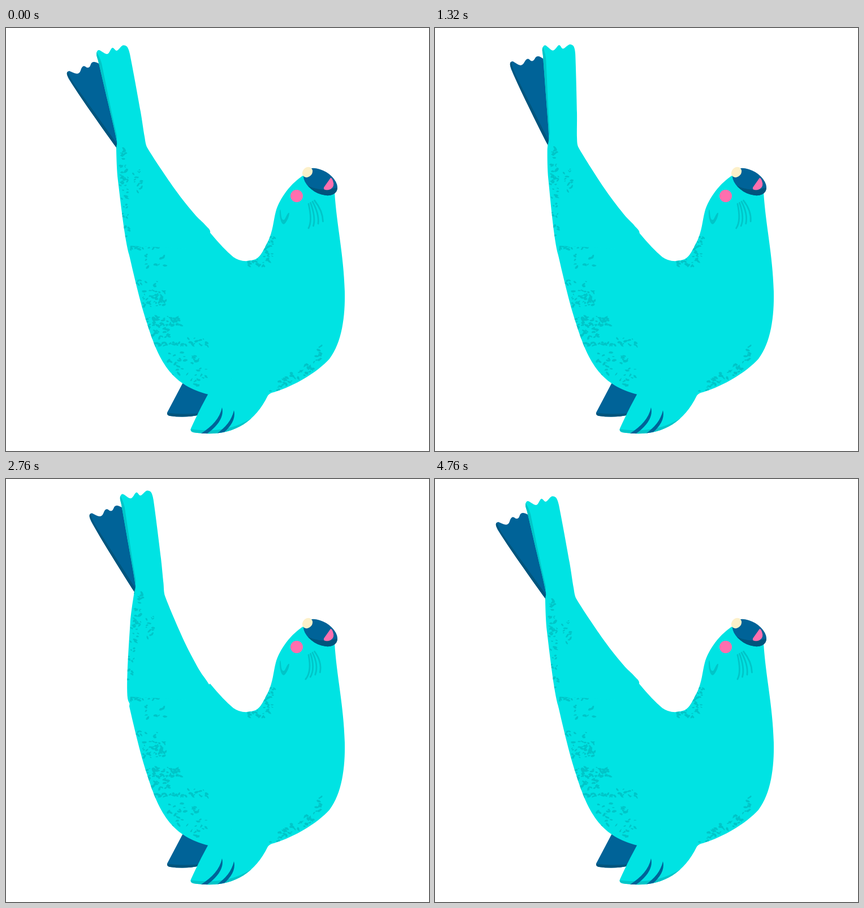
Animation of 748 by 748 pixels, one loop 4800 ms. Source, as an HTML page with a canvas:

```html
<!DOCTYPE html>
<html lang="en">
<head>
<meta charset="utf-8">
<title>Dancing seal</title>
<style>
html, body { margin: 0; width: 100%; height: 100%; overflow: hidden; background: #fff; }
canvas { display: block; width: 748px; height: 748px; }
</style>
</head>
<body>
<canvas id="stage" width="748" height="748"></canvas>
<script>
const ctx = document.getElementById('stage').getContext('2d');
const LOOP = 4800;
const CYAN = '#00e3e3', SHADE = '#00c5c8', BLUE = '#006398', DEEP = '#00557d', PINK = '#ff6fae', CREAM = '#fdf0c9';
const HIP = [290, 380], NECK = [222, 208];

// [time, degrees] of the upper body and of the tail fins
const BODY_KEYS = [[280, 0], [560, 7], [860, 19.3], [960, 18.2], [1320, 1.3], [1400, 0],
  [1790, 12], [1920, 9.3], [2330, 0], [2760, 10.5], [2870, 12.3], [3400, 0], [LOOP, 0]];
const FIN_KEYS = [[280, 0], [560, -1], [960, 17.7], [1080, 18.5], [1320, 9], [1640, 1],
  [1920, 12.8], [1980, 13.2], [2240, 7], [2560, 0], [2760, 3.2], [3080, 13.5], [3360, 6], [3480, 1.9], [3640, 0], [LOOP, 0]];

const FIN = [[196, 200], [179, 126], [163, 58], [160, 46], [164, 39], [179, 46],
  [188, 35], [196, 40], [206, 31], [214, 33], [219, 46], [238, 148], [245, 192]];
const LIMB_RIGHT = [[250, 212], [300, 287], [335, 331], [352, 348], [361, 362], [330, 430], [245, 420]];
const LIMB_LEFT = [[218, 402], [198, 270], [195, 216]];
const BACK_FIN = new Path2D('M197 214C160 163 122 108 111 90Q104 77 112 76L119 79Q129 84 132 75Q135 65 140 68' +
  'Q147 74 150 64Q153 56 166 64L205 200Z');
const TORSO = new Path2D('M220 385L218 402C224 428 237 485 249 521C272 596 296 632 358 648' +
  'C370 656 440 660 463 650Q467 645 474 644C512 632 550 609 572 585C594 556 600 510 599 466C597 398 585 352 581 290' +
  'L527 260C505 273 484 300 477 325C473 340 472 360 463 378C456 391 451 404 441 409Q419 417 402 405' +
  'Q384 390 361 362L320 390Z');
const FLIPPER = new Path2D('M357 648C347 666 336 688 327 708Q325 713 331 715C392 724 436 705 463 650L380 610Z');
const BACK_FLIPPER = new Path2D('M314 625L285 680Q284 685 290 686Q317 690 343 684L364 640Z');
const CLAW = new Path2D('M382 671C387 690 370 707 356 717L345 717C365 704 378 690 382 671Z');
const MOUTH = new Path2D('M574 265Q576 265 578 270Q582 280 574 285Q567 288 562 285L562 282Z');
const EYE = new Path2D('M485 321C487 321 485 342 492 339C494 338 498 325 501 327C501 334 495 346 491 347C484 346 483 323 485 321Z');

let seed = 7;
const random = () => (seed = (seed * 16807) % 2147483647) / 2147483647;

// angular flecks scattered in boxes: centre, half size, count, slope
function flecks(groups) {
  const path = new Path2D();
  for (const [cx, cy, w, h, count, slope = 0] of groups) {
    for (let i = 0; i < count; i++) {
      const dx = (random() * 2 - 1) * w, x = cx + dx;
      const y = cy + (random() * 2 - 1) * h + dx * slope;
      const long = 2 + random() * 3, tilt = random() * 2 - 1;
      for (let k = 0; k < 7; k++) {
        const a = k / 7 * Math.PI * 2, r = long * (0.55 + 0.6 * random());
        const [u, v] = turn([x + Math.cos(a) * r, y + Math.sin(a) * r / 2], [x, y], tilt);
        path[k ? 'lineTo' : 'moveTo'](u, v);
      }
      path.closePath();
    }
  }
  return path;
}

const TORSO_FLECKS = flecks([
  [245, 385, 28, 6, 32], [266, 411, 20, 12, 11], [249, 451, 20, 7, 10], [260, 479, 23, 15, 52],
  [280, 518, 32, 8, 46], [270, 537, 20, 12, 34], [296, 559, 36, 3, 30], [340, 556, 18, 8, 14],
  [303, 594, 20, 20, 20], [341, 605, 14, 28, 24], [464, 388, 12, 18, 32], [447, 415, 20, 8, 20],
  [512, 615, 45, 9, 52, -0.6], [553, 570, 4, 12, 7]
]);
const LIMB_FLECKS = flecks([
  [208, 224, 5, 10, 7], [209, 265, 7, 22, 28], [233, 270, 8, 20, 13], [210, 330, 8, 40, 18]
]);

// eased key values: smooth through the points, flat at the turning points
function track(keys, t) {
  if (t <= keys[0][0]) return 0;
  const slope = i => {
    if (i === 0 || i === keys.length - 1) return 0;
    const [[t0, a], [t1, b], [t2, c]] = [keys[i - 1], keys[i], keys[i + 1]];
    const before = (b - a) / (t1 - t0), after = (c - b) / (t2 - t1);
    return before * after <= 0 ? 0 : 2 * before * after / (before + after);
  };
  let i = 0;
  while (i < keys.length - 2 && t >= keys[i + 1][0]) i++;
  const [[t0, a], [t1, b]] = [keys[i], keys[i + 1]];
  const d = t1 - t0, u = (t - t0) / d, v = 1 - u;
  return a * v * v * (1 + 2 * u) + b * u * u * (3 - 2 * u) + d * u * v * (slope(i) * v - slope(i + 1) * u);
}

function radians(deg) {
  return deg * Math.PI / 180;
}

function turn([x, y], [cx, cy], angle) {
  const c = Math.cos(angle), s = Math.sin(angle), dx = x - cx, dy = y - cy;
  return [cx + dx * c - dy * s, cy + dx * s + dy * c];
}

function spline(points) {
  const path = new Path2D(), n = points.length, at = i => points[(i + n) % n];
  path.moveTo(...points[0]);
  for (let i = 0; i < n; i++) {
    const [p, a, b, q] = [at(i - 1), at(i), at(i + 1), at(i + 2)];
    // short spans keep short handles so that the outline never loops
    const span = Math.hypot(b[0] - a[0], b[1] - a[1]);
    const reach = (u, v) => Math.min(1 / 6, span / 3 / Math.hypot(v[0] - u[0], v[1] - u[1]));
    const m = reach(p, b), k = reach(a, q);
    path.bezierCurveTo(a[0] + (b[0] - p[0]) * m, a[1] + (b[1] - p[1]) * m,
      b[0] - (q[0] - a[0]) * k, b[1] - (q[1] - a[1]) * k, ...b);
  }
  return path;
}

function fill(path, color) {
  ctx.fillStyle = color;
  ctx.fill(path);
}

// fills the part of a shape that lies under a mask
function shade(mask, path, color) {
  ctx.save();
  ctx.clip(mask);
  fill(path, color);
  ctx.restore();
}

function rotateAbout([x, y], angle) {
  ctx.translate(x, y);
  ctx.rotate(angle);
  ctx.translate(-x, -y);
}

function ellipse(x, y, rx, ry, deg) {
  const path = new Path2D();
  path.ellipse(x, y, rx, ry, radians(deg), 0, Math.PI * 2);
  return path;
}

const MUZZLE = ellipse(556, 272, 33, 20, 31);
const BACK_FIN_SHADE = new Path2D('M100 70L111 80Q113 88 122 101L200 210L185 212Z');
const FIN_SHADE = new Path2D('M156 36Q164 46 169 62C178 105 186 148 196 190L196 214L184 214Z');
const FLIPPER_SHADE = new Path2D('M324 709C360 714 398 713 434 690L420 720L320 722Z');
const BACK_FLIPPER_SHADE = new Path2D('M280 680Q315 685 350 680L346 692L280 690Z');
const MUZZLE_SHADE = new Path2D('M528 276Q555 292 590 281L588 305L530 300Z');

function drawTail(t) {
  const body = radians(track(BODY_KEYS, t)), fin = radians(track(FIN_KEYS, t));
  const neck = turn(NECK, HIP, body), shift = [neck[0] - NECK[0], neck[1] - NECK[1]];
  const limbPoint = p => turn(p, HIP, body);
  const finPoint = p => turn([p[0] + shift[0], p[1] + shift[1]], neck, fin);
  const toFin = () => { rotateAbout(neck, fin); ctx.translate(...shift); };
  const tail = spline([...LIMB_LEFT.map(limbPoint), ...FIN.map(finPoint), ...LIMB_RIGHT.map(limbPoint)]);

  ctx.save();
  toFin();
  fill(BACK_FIN, BLUE);
  shade(BACK_FIN, BACK_FIN_SHADE, DEEP);
  ctx.restore();

  fill(tail, CYAN);
  ctx.save();
  ctx.clip(tail);
  ctx.save();
  toFin();
  fill(FIN_SHADE, SHADE);
  ctx.restore();
  rotateAbout(HIP, body);
  fill(LIMB_FLECKS, SHADE);
  ctx.restore();
}

function drawBody() {
  fill(BACK_FLIPPER, BLUE);
  shade(BACK_FLIPPER, BACK_FLIPPER_SHADE, DEEP);
  fill(TORSO, CYAN);
  shade(TORSO, TORSO_FLECKS, SHADE);
  fill(FLIPPER, CYAN);
  shade(FLIPPER, FLIPPER_SHADE, SHADE);
  fill(CLAW, BLUE);
  ctx.save();
  ctx.clip(FLIPPER);
  ctx.translate(21, 5);
  fill(CLAW, BLUE);
  ctx.restore();
}

function drawFace(t) {
  fill(MUZZLE, BLUE);
  shade(MUZZLE, MUZZLE_SHADE, DEEP);
  fill(MOUTH, PINK);
  fill(ellipse(533, 255, 10, 8.3, -45), CREAM);
  fill(ellipse(514, 297, 11, 11, 0), PINK);
  fill(EYE, SHADE);

  const phase = Math.pow(t % 1600 / 1600, 0.85);
  const sway = -5.6 * (1 - Math.cos(phase * Math.PI * 2));
  ctx.strokeStyle = SHADE;
  ctx.lineWidth = 2.8;
  ctx.lineCap = 'round';
  for (let i = 0; i < 4; i++) {
    ctx.beginPath();
    ctx.moveTo(535 + 3.5 * i, 311 - 2 * i);
    ctx.quadraticCurveTo(542 + 6 * i + sway * 0.2, 341 - 6 * i, 535 + 8.5 * i + sway, 354 - 4 * i);
    ctx.stroke();
  }
}

function frame() {
  const t = performance.now() % LOOP;
  ctx.fillStyle = '#fff';
  ctx.fillRect(0, 0, 748, 748);
  drawTail(t);
  drawBody();
  drawFace(t);
  requestAnimationFrame(frame);
}
frame();
</script>
</body>
</html>
```
